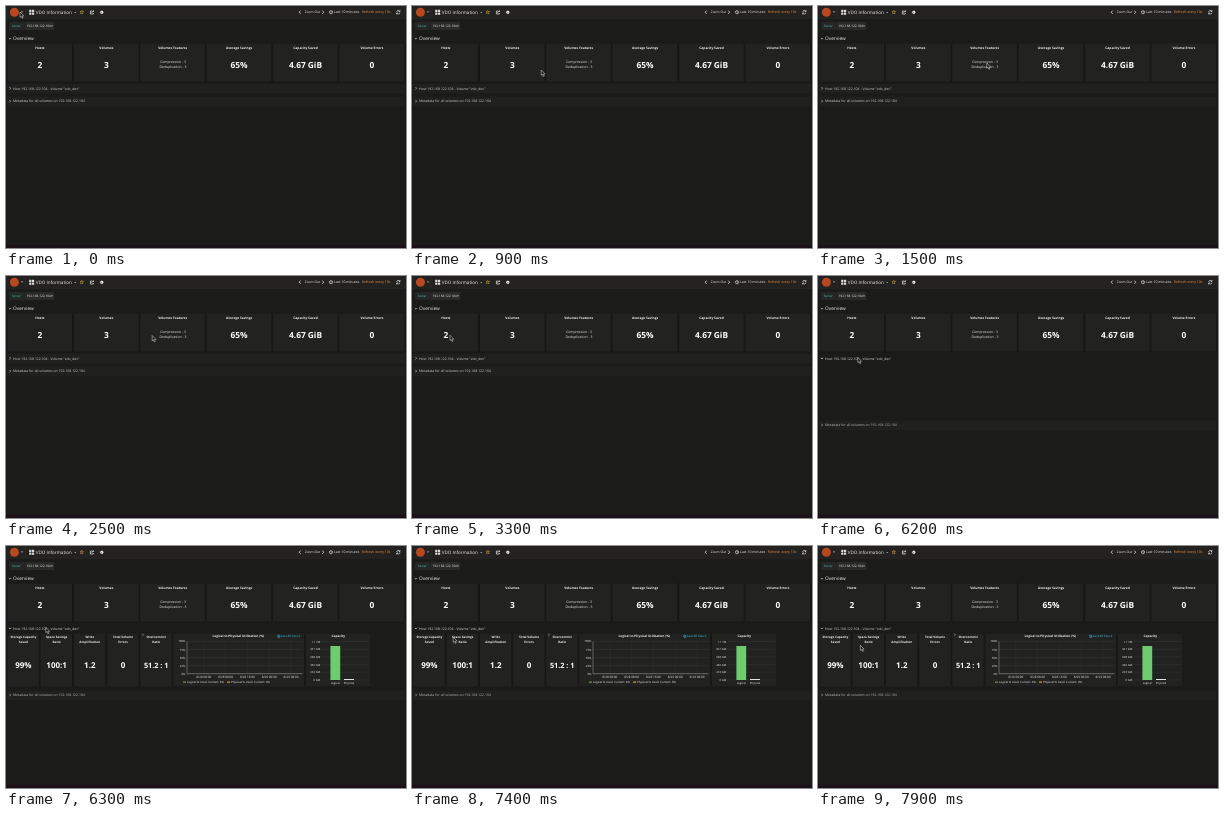
Write an HTML page that moves like this. It is 400 px wide and 242 px high and loops after 8 s.

```html
<!DOCTYPE html>
<html lang="en">
<head>
<meta charset="utf-8">
<title>VDO Information</title>
<style>
html, body { margin: 0; width: 100%; height: 100%; overflow: hidden; background: #1b1b1a; }
svg { display: block; width: 100vw; height: 100vh; }
text { font-family: "Open Sans", "Noto Sans", sans-serif; text-rendering: geometricPrecision; white-space: pre; }
</style>
</head>
<body>
<svg id="stage" viewBox="0 0 400 242"></svg>
<script>
const stage = document.getElementById('stage');
const LIGHT = '#f0f0ef', GREY = '#d2d2d1', PANEL = '#222221', HOST = '192.168.122.104';

function add(parent, tag, attrs) {
  const node = document.createElementNS('http://www.w3.org/2000/svg', tag);
  for (const key in attrs) node.setAttribute(key, attrs[key]);
  return parent.appendChild(node);
}
const group = () => add(stage, 'g', {});
const rect = (g, x, y, width, height, fill, rx = 0) => add(g, 'rect', { x, y, width, height, fill, rx });
const panel = (g, x, y, w, h) => rect(g, x, y, w, h, PANEL, 0.5).setAttribute('stroke', '#181818');
const line = (g, d, stroke, w = 0.6) => add(g, 'path', { d, stroke, fill: 'none', 'stroke-width': w });
function label(g, str, x, y, size, fill = LIGHT, anchor = 'start', weight = 400) {
  const node = add(g, 'text', { x, y: y + size * 0.36, 'font-size': size, fill, 'text-anchor': anchor, 'font-weight': weight });
  node.textContent = str;
  return node;
}
const bold = (g, str, x, y, size, fill = LIGHT) => label(g, str, x, y, size, fill, 'middle', 700);
const caret = (g, x, y) => add(g, 'path', { d: `M${x - 1} ${y - 0.5}h2l-1 1.2z`, fill: GREY });
const chevron = (g, x, y, open, color = GREY) =>
  line(g, open ? `M${x - 1.1} ${y - 0.5}l1.1 1.1l1.1-1.1` : `M${x - 0.5} ${y - 1.2}l1.1 1.2l-1.1 1.2`, color, 0.65);

function clock(g, x, y, r, color) {
  add(g, 'circle', { cx: x, cy: y, r, fill: 'none', stroke: color, 'stroke-width': 0.6 });
  line(g, `M${x} ${y - r * 0.65}v${r * 0.75}h${r * 0.5}`, color, 0.45);
}

function topBar() {
  const g = group();
  rect(g, 0, 0, 400, 12.5, '#232221');
  rect(g, 0, 12.5, 400, 0.5, '#2a2929');
  add(g, 'circle', { cx: 8.4, cy: 6.2, r: 4.5, fill: '#b8481f' });
  caret(g, 16, 6);
  line(g, 'M19.5 1v11', '#2e2d2d', 0.5);
  for (const x of [23.2, 26]) for (const y of [3.8, 6.6]) rect(g, x, y, 2.2, 2.2, '#dcdcdc', 0.3);
  label(g, 'VDO Information', 29.7, 6.1, 4.55);
  caret(g, 69.2, 6.4);
  let star = '';
  for (let i = 0; i < 10; i++) {
    const a = Math.PI * (i / 5 - 0.5), r = i % 2 ? 0.9 : 1.9;
    star += `${(75.8 + r * Math.cos(a)).toFixed(2)},${(6.2 + r * Math.sin(a)).toFixed(2)} `;
  }
  add(g, 'polygon', { points: star, fill: 'none', stroke: '#d0a22c', 'stroke-width': 0.6 });
  line(g, 'M85.8 5h-1.4v3h3v-.9M85.6 6.7q.3-1.5 1.8-1.5M86.8 4.3l1.1 .9l-1.1 .9', LIGHT, 0.7);
  add(g, 'circle', { cx: 95.8, cy: 6.2, r: 1, fill: 'none', stroke: LIGHT, 'stroke-width': 1.1 });
  add(g, 'circle', { cx: 95.8, cy: 6.2, r: 1.65, fill: 'none', stroke: LIGHT, 'stroke-width': 0.4, 'stroke-dasharray': '.65 .65' });
  line(g, 'M294.6 4.6l-1.4 1.6l1.4 1.6M316.3 4.6l1.4 1.6l-1.4 1.6', LIGHT, 0.75);
  label(g, 'Zoom Out', 298.8, 6.1, 3.25);
  clock(g, 325, 6.2, 1.6, LIGHT);
  label(g, 'Last 10 minutes', 328, 6.1, 3.45);
  label(g, 'Refresh every 10s', 355.8, 6.1, 3.5, '#f0903a');
  line(g, 'M390.7 5.9a1.6 1.6 0 0 1 3-.7M393.9 6.5a1.6 1.6 0 0 1-3 .7M394 4v1.4h-1.4M390.6 8.4v-1.4h1.4', LIGHT, 0.65);
}

function filters() {
  const g = group();
  rect(g, 3, 16, 15.5, 8, '#252726', 0.6);
  label(g, 'Server', 5.8, 20, 3, '#4fd0c2');
  rect(g, 18.8, 16, 29.5, 8, '#2a2a29', 0.6);
  label(g, HOST, 20.5, 20, 3.2);
  caret(g, 46, 20);
}

function overview() {
  const g = group();
  chevron(g, 4, 32.6, true, LIGHT);
  label(g, 'Overview', 7, 32.4, 4.8);
  const cells = [['Hosts', '2'], ['Volumes', '3'], ['Volumes Features'],
    ['Average Savings', '65%'], ['Capacity Saved', '4.67 GiB'], ['Volume Errors', '0']];
  cells.forEach(([title, value], i) => {
    const x = 1 + i * 66.4, mid = x + 32.9;
    panel(g, x, 37, 65.6, 39);
    bold(g, title, mid, 41.4, 3.25);
    if (value) bold(g, value, mid, 59.2, 8.35, '#fff');
  });
  label(g, 'Compression - 3', 167, 56, 3.4, LIGHT, 'middle');
  label(g, 'Deduplication - 3', 167, 61, 3.4, LIGHT, 'middle');
}

function row(y, title, open, color = GREY) {
  const g = group();
  if (!open) {
    rect(g, 1, y - 4.4, 397.5, 8.8, '#20201f', 0.5);
    line(g, `M1 ${y + 4.5}H398.5`, '#262625', 0.4);
  }
  const arrow = chevron(g, 4, y, open, color);
  const text = label(g, title, 7, y, 3.43, color);
  return { g, arrow, text };
}

function details() {
  const g = group();
  const cells = [['Storage Capacity', 'Saved', '99%'], ['Space Savings', 'Ratio', '100:1'],
    ['Write', 'Amplification', '1.2'], ['Total Volume', 'Errors', '0'], ['Overcommit', 'Ratio', '51.2 : 1']];
  cells.forEach(([a, b, value], i) => {
    const x = 1 + i * 33.2, mid = x + 16.4;
    panel(g, x, 87, 32.4, 54);
    bold(g, a, mid, 91, 3.1);
    bold(g, b, mid, 96, 3.1);
    bold(g, value, mid, 119.6, i == 4 ? 7.3 : 8, '#fff');
  });
  line(g, 'M136.2 87.6l1.2 1.2l-1.2 1.2', GREY, 0.5);

  panel(g, 167, 87, 131.5, 54);
  bold(g, 'Logical vs Physical Utilization (%)', 232.3, 90.3, 3.15);
  clock(g, 272.8, 90.3, 1.2, '#35c4f5');
  label(g, 'Last 48 hours', 275, 90.3, 3.05, '#35c4f5');
  for (let i = 0; i < 5; i++) {
    const y = 95.4 + i * 8.1, x = 197.8 + i * 21.8;
    line(g, `M181 ${y}H296.5`, '#3c3c3b', 0.4);
    line(g, `M${x} 95.4v32.4`, '#333332', 0.4);
    label(g, 100 - i * 25 + '%', 179.4, y, 2.85, LIGHT, 'end');
    label(g, `8/2${8 + (i > 2)} ${['00', '08', '16'][i % 3]}:00`, x, 131, 3.05, LIGHT, 'middle');
  }
  line(g, 'M181 95.4v32.3H296.5', '#a0a2a2', 0.5);
  rect(g, 177, 135.6, 3, 1, '#7eb26d');
  label(g, 'Logical % Used  Current: 0%', 181, 136.1, 2.85);
  rect(g, 221, 135.6, 3, 1, '#eab839');
  label(g, 'Physical % Used  Current: 0%', 225, 136.1, 2.9);

  panel(g, 299.5, 87, 65.5, 54);
  bold(g, 'Capacity', 332.3, 90.3, 3.15);
  ['1.1 TiB', '931 GiB', '698 GiB', '466 GiB', '233 GiB', '0 GiB'].forEach((s, i) => {
    const y = 95.5 + i * 7.7;
    line(g, `M316 ${y}H363`, '#393938', 0.4);
    label(g, s, 314.3, y, 2.8, LIGHT, 'end');
  });
  rect(g, 324.4, 100, 9.8, 34, '#6ecb70');
  rect(g, 338, 133, 10, 1, '#e4e4e4');
  label(g, 'Logical', 329.2, 137.3, 2.85, LIGHT, 'middle');
  label(g, 'Physical', 343, 137.3, 2.85, LIGHT, 'middle');
  return g;
}

topBar();
filters();
overview();
const hostTitle = `Host ${HOST} - Volume "vdo_dev"`, metaTitle = `Metadata for all volumes on ${HOST}`;
const hostClosed = row(82.3, hostTitle, false), hostOpen = row(82.3, hostTitle, true);
const metaClosed = row(95.2, metaTitle, false), metaLow = row(149, metaTitle, false, '#bababa');
const panels = details();
rect(stage, 0, 238.8, 400, 3.2, '#1d1119');
const cursor = add(stage, 'path', {
  d: 'M0 0v5.2l1.2-1l.9 2.1l.9-.4l-.9-2h1.7z', fill: '#111', stroke: '#e8e8e8', 'stroke-width': 0.5
});

// start ms, number of 100 ms steps, target x, y
const moves = [
  [500, 3, 98.5, 69.3], [900, 4, 168.8, 57.3], [1500, 1, 168.8, 57], [2100, 2, 168.4, 57.6],
  [2400, 2, 146.2, 59.5], [2700, 2, 90.3, 62], [3000, 2, 42.2, 59.3], [3300, 1, 38, 59.2],
  [3500, 2, 38.2, 59.8], [3800, 1, 38.5, 60], [4300, 3, 40, 79.8], [4700, 1, 39.8, 81.4],
  [7400, 3, 42.3, 98.9], [7900, 1, 42.3, 99.2]
];

function pointer(t) {
  let x = 14, y = 6;
  for (const [start, steps, tx, ty] of moves) {
    if (t < start) break;
    const f = Math.min(1, (Math.floor((t - start) / 100) + 1) / steps);
    const k = f * (2 - f);
    x += (tx - x) * k;
    y += (ty - y) * k;
  }
  return [x, y];
}

const show = (node, on) => node.setAttribute('visibility', on ? 'visible' : 'hidden');

function draw(t) {
  const open = t >= 6200, hover = t >= 4500 && t < 7500;
  show(hostClosed.g, !open);
  show(metaClosed.g, !open);
  show(hostOpen.g, open);
  show(metaLow.g, open);
  show(panels, t >= 6300);
  for (const r of [hostClosed, hostOpen]) {
    r.arrow.setAttribute('stroke', hover ? '#fff' : GREY);
    r.text.setAttribute('fill', hover ? '#dededd' : GREY);
  }
  cursor.setAttribute('transform', `translate(${pointer(t)})`);
}

const began = performance.now();
function tick() {
  draw((performance.now() - began) % 8000);
  requestAnimationFrame(tick);
}
tick();
</script>
</body>
</html>
```
